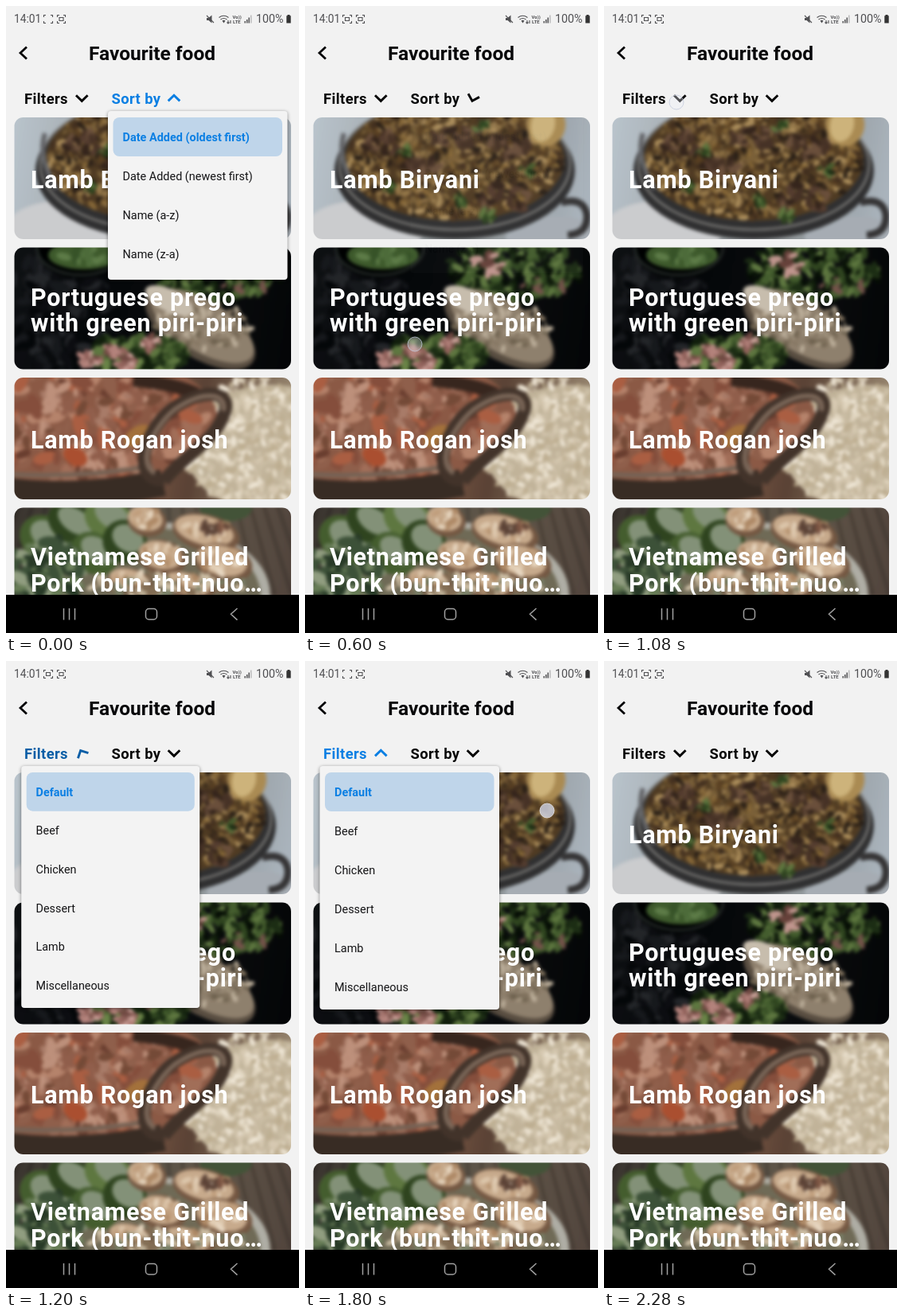
An HTML page with a canvas that plays this animation: 368 by 788 pixels, repeating every 2400 ms.

```html
<!DOCTYPE html>
<html lang="en">
<head>
<meta charset="utf-8">
<title>Favourite food</title>
<style>
  html, body { margin: 0; width: 100%; height: 100%; overflow: hidden; background: #f2f2f2; }
  canvas, svg { position: absolute; left: 0; top: 0; }
  text { font-family: Roboto, sans-serif; font-size: 14.45px; fill: #151517; }
  .title { font-size: 24.5px; font-weight: 700; fill: #08080a; }
  .tab { font-size: 18.4px; font-weight: 700; letter-spacing: .4px; fill: inherit; }
  .dish { font-size: 30.5px; font-weight: 700; letter-spacing: .75px; fill: #fff; }
  .on { font-weight: 700; fill: #0b7fe3; }
  .status text { fill: #505053; }
  .panel { filter: drop-shadow(0 1px 2px #0007); }
  .line { fill: none; }
</style>
</head>
<body>
<canvas id="photos" width="368" height="788"></canvas>
<svg id="ui" width="368" height="788" viewBox="0 0 368 788">
  <g class="status" fill="#505053" stroke="#505053" stroke-width="0">
    <text x="10" y="21" style="font-size:13.8px">14:01</text>
    <g class="line" stroke-width="1.1">
      <path d="M50 11.5h-2.5v2.5M56 11.5h2.5v2.5M50 21.5h-2.5v-2.5M56 21.5h2.5v-2.5"/>
      <path d="M67 11.5h-2.5v2.5M72 11.5h2.5v2.5M67 21.5h-2.5v-2.5M72 21.5h2.5v-2.5M67 14.5h5v4h-5z"/>
      <path id="blink" d="M50.5 14.5h5v4h-5z"/>
      <path d="M252 12l9 9M267.5 14.5q6-4.5 12 0M269.5 17q4-3 8 0M279 18v4m-1.5-1.5l1.5 1.5 1.5-1.5M282 22v-4"/>
    </g>
    <path d="M252 15h2.5l4-3.5v10l-4-3.5h-2.5zM271.5 18.5q2-1.5 4 0l-2 3z"/>
    <text x="284.5" y="15.5" style="font-size:6px;font-weight:700">Vo))</text>
    <text x="285" y="22" style="font-size:6px;font-weight:700">LTE</text>
    <path d="M299.500 19h1.500v2.500h-1.500zM302 17h1.500v4.500h-1.500zM304.500 14.500h1.500v7h-1.500z"/>
    <path opacity=".35" d="M307 11.500h1.500v10h-1.500z"/>
    <text x="314" y="21" style="font-size:14.3px">100%</text>
    <path d="M353.500 11h3v1.200h1.200v9.300h-5.400v-9.300h1.200z" fill="#333"/>
  </g>
  <path class="line" d="M26 51.500l-8 7.500 8 7.500" stroke="#08080a" stroke-width="2.800"/>
  <text class="title" x="104" y="67.700">Favourite food</text>
  <g id="dishes"></g>
  <g id="tabs"></g>
  <g id="menus"></g>
  <circle id="touch" r="9"/>
  <path d="M0 740h368v48H0z"/>
  <g class="line" stroke="#a0a0a0" stroke-width="1.500">
    <path d="M72.500 757v14.500M79.500 757v14.500M86.500 757v14.500M290.500 757l-8 7.300 8 7.300"/>
    <rect x="175.500" y="757.500" width="14" height="13.500" rx="4"/>
  </g>
</svg>
<script>
const $ = id => document.getElementById(id);

// ---- photographs, painted as soft shapes ----
const scene = document.createElement('canvas');
scene.width = 368; scene.height = 788;
const g = scene.getContext('2d');
let seed = 7;
const rnd = () => (seed = (seed * 16807) % 2147483647) / 2147483647;
const pick = list => list[Math.floor(rnd() * list.length)];

function oval(x, y, rx, ry, color, turn = 0, line = 0) {
  g.beginPath();
  g.ellipse(x, y, rx, ry, turn, 0, 7);
  g.lineWidth = line;
  g.fillStyle = g.strokeStyle = color;
  line ? g.stroke() : g.fill();
}
function scatter(x, y, rx, ry, count, size, colors) {
  for (let i = 0; i < count; i++) {
    const a = rnd() * 6.283, r = Math.sqrt(rnd()), s = size * (.5 + rnd());
    oval(x + rx * r * Math.cos(a), y + ry * r * Math.sin(a), s, s * .5, pick(colors), rnd() * 3.1);
  }
}
function curve(d, color, width) {
  g.strokeStyle = color;
  g.lineWidth = width;
  g.stroke(new Path2D(d));
}
function backdrop(y, h, ...colors) {
  const fill = g.createLinearGradient(0, y, 368, y + h * .4);
  colors.forEach((c, i) => fill.addColorStop(i / (colors.length - 1), c));
  g.fillStyle = fill;
  g.fillRect(0, y - 5, 368, h + 10);
}

const leaf = ['#4b6137', '#384b2a', '#627847', '#273620'];
const rice = ['#c4b8a2', '#d8cebb', '#e2dacb', '#cdc1ac', '#b7a98f'];

function biryani() {
  backdrop(140, 153, '#b5bfc7', '#9ea3a6', '#8b9092', '#a7b0b8');
  oval(75, 280, 75, 36, '#c3c4c6');
  oval(312, 290, 60, 26, '#a2a8ae');
  oval(188, 207, 151, 86, '#39393a');
  oval(188, 199, 145, 82, '#777674', 0, 3);
  oval(188, 193, 138, 77, '#55432d');
  scatter(188, 193, 134, 73, 950, 5, ['#7a6340', '#5f482d', '#92784f', '#49382a', '#332a22', '#84693f', '#a88d60']);
  [[102, 174, 28, 14], [250, 242, 32, 19], [195, 165, 32, 12], [144, 202, 22, 10], [256, 175, 25, 12]]
    .forEach(([x, y, rx, ry]) => scatter(x, y, rx, ry, 22, 7, ['#594438', '#3d2f27', '#4d3b30', '#6d5543']));
  [[122, 181], [197, 243], [228, 262], [107, 226], [218, 150], [280, 207]]
    .forEach(([x, y]) => scatter(x, y, 10, 7, 9, 5, leaf));
  oval(303, 150, 24, 27, '#a68a58', .2);
  oval(299, 149, 15, 22, '#c5ae7c', .2);
  curve('M322 247Q350 240 354 262Q356 286 330 288', '#3e3d3e', 9);
  curve('M49 160Q39 190 64 230', '#66676a', 6);
}
function prego() {
  backdrop(303, 154, '#1c1e20', '#121416', '#17191b', '#121314');
  scatter(60, 390, 80, 75, 140, 9, ['#222427', '#121416', '#2d2f32', '#191a1d']);
  oval(94, 306, 56, 36, '#0d0f0f');
  oval(94, 304, 55, 34, '#303533', 0, 3);
  oval(98, 313, 45, 18, '#455e35');
  scatter(98, 313, 35, 12, 22, 8, ['#536e42', '#3f5832', '#617c4e']);
  scatter(260, 334, 85, 40, 210, 8, [...leaf, '#1c2718', '#131a12']);
  scatter(230, 325, 18, 13, 16, 7, ['#987068', '#b9938c', '#694842']);
  scatter(300, 352, 27, 14, 15, 6, ['#755750', '#4c6138']);
  oval(244, 406, 78, 36, '#5d5348', .55);
  oval(247, 402, 73, 32, '#8d806f', .55);
  scatter(247, 402, 60, 29, 100, 5, ['#a29582', '#817462', '#b5a997', '#706554']);
  oval(205, 370, 33, 14, '#c0b7a9', .45);
  scatter(164, 439, 64, 24, 160, 8, [...leaf, '#6c834d', '#1d2919']);
  [[136, 435], [152, 448], [106, 444], [185, 424]].forEach(([x, y]) =>
    scatter(x, y, 13, 9, 18, 6, ['#ad817b', '#73504a', '#c5a099', '#8f655f']));
  scatter(205, 440, 20, 19, 35, 7, leaf);
}
function roganJosh() {
  backdrop(467, 153, '#835c4b', '#956b58', '#5e493d', '#9c8d78');
  oval(333, 556, 108, 80, '#baae97');
  scatter(316, 549, 95, 82, 540, 5, rice);
  oval(94, 520, 172, 84, '#8a5e4c');
  scatter(98, 518, 150, 74, 190, 12, ['#9e705d', '#855444', '#b0836e', '#6c4538', '#a66249', '#8e6351']);
  [[68, 494, 25], [126, 510, 32], [174, 484, 25], [33, 540, 25], [120, 573, 29]]
    .forEach(([x, y, r]) => scatter(x, y, r, r * .6, 24, 8, ['#a47c6b', '#b78f7c', '#76503f', '#8f6251']));
  oval(87, 566, 16, 11, '#a65539', .5);
  oval(165, 540, 19, 11, '#a07343', -.6);
  curve('M160 470Q215 475 240 488', '#3f3029', 16);
  curve('M-5 588Q95 594 184 578', '#77665a', 6);
  curve('M-5 609Q90 622 197 599', '#40352e', 34);
  curve('M199 596C157 598 172 535 208 507C246 480 283 483 275 509C264 548 222 565 198 597', '#493c34', 16);
  curve('M187 587C164 575 183 531 212 507C247 483 278 485 273 509', '#7c6a5d', 6);
}
function bunThit() {
  backdrop(630, 110, '#403a36', '#55534a', '#665c50', '#564b44');
  for (let x = 0; x < 368; x += 17) curve(`M${x} 625l${x / 4 - 45} 115`, '#0002', 5);
  oval(182, 740, 150, 92, '#aaa9a1');
  oval(182, 742, 138, 86, '#716d5b');
  [[51, 671, 36, 29], [83, 651, 33, 24], [129, 644, 32, 26], [111, 688, 31, 25], [149, 673, 28, 27]]
    .forEach(([x, y, rx, ry], i) => {
      oval(x, y, rx, ry, leaf[i % 3], .6);
      oval(x + 4, y - 4, rx * .75, ry * .6, '#839079', .6);
    });
  scatter(53, 709, 46, 35, 90, 10, ['#697c5a', '#445640', '#8f9a80', '#324231']);
  oval(276, 632, 33, 16, '#4a5840');
  [[177, 647, 25, 20], [251, 662, 43, 23], [196, 693, 31, 22], [273, 700, 37, 24], [157, 724, 29, 17], [229, 729, 34, 17]]
    .forEach(([x, y, rx, ry]) => {
      oval(x, y, rx, ry, '#765c49', .25);
      oval(x - 2, y - 3, rx * .88, ry * .78, '#c0a68b', .25);
      scatter(x, y - 2, rx * .7, ry * .6, 14, 6, ['#d3bfa7', '#a98869', '#dccdb9', '#b99b7d']);
    });
  scatter(261, 655, 19, 8, 14, 5, ['#604a3f', '#7b5848']);
  scatter(204, 729, 99, 14, 60, 7, ['#c5b8a1', '#826f59', '#79806a']);
}

const ctx = $('photos').getContext('2d');
[[140, 153, biryani], [303.5, 153, prego], [467, 153, roganJosh], [630.5, 153, bunThit]].forEach(([y, h, paint]) => {
  g.save();
  g.beginPath();
  g.rect(0, y - 5, 368, h + 10);
  g.clip();
  paint();
  g.restore();
  ctx.save();
  ctx.beginPath();
  ctx.roundRect(10.5, y, 347.5, h, 11);
  ctx.clip();
  ctx.filter = 'blur(1.9px) contrast(1.12)';
  ctx.drawImage(scene, 0, 0);
  ctx.restore();
});

// ---- labels, tabs and menus ----
$('dishes').innerHTML = [
  [229, 'Lamb Biryani'], [376.5, 'Portuguese prego'], [409, 'with green piri-piri'],
  [556, 'Lamb Rogan josh'], [703, 'Vietnamese Grilled'], [735.5, 'Pork (bun-thit-nuo…']
].map(([y, s]) => `<text class="dish" x="31" y="${y}">${s}</text>`).join('');

// Each menu shows during steps from..to, moving on its first and last step.
const menus = [
  { label: 'Sort by', x: 132.5, arrow: 211, left: 128, from: -1, to: 5,
    items: ['Date Added (oldest first)', 'Date Added (newest first)', 'Name (a-z)', 'Name (z-a)'] },
  { label: 'Filters', x: 23, arrow: 95.3, left: 18.5, from: 10, to: 16,
    items: ['Default', 'Beef', 'Chicken', 'Dessert', 'Lamb', 'Miscellaneous'] }
];
const maxHeight = 306;
for (const m of menus) {
  $('tabs').insertAdjacentHTML('beforeend',
    `<g><text class="tab" x="${m.x}" y="123">${m.label}</text>
     <path class="line" d="M-7.300-3.600L0 3.600 7.300-3.600" stroke-width="2.900"/></g>`);
  m.tab = $('tabs').lastElementChild;
  const rows = m.items.map((s, i) =>
    `<text class="${i ? '' : 'on'}" x="${m.left + 18.5}" y="${170 + 49 * i}">${s}</text>`).join('');
  const height = Math.min(maxHeight, m.items.length * 49 + 16);
  $('menus').insertAdjacentHTML('beforeend',
    `<g><rect class="panel" x="${m.left}" y="132" width="225.500" height="${height}" rx="4" fill="#f3f3f3"/>
     <rect x="${m.left + 6.5}" y="140" width="212.500" height="49" rx="8" fill="#bfd5ea"/>${rows}</g>`);
  m.panel = $('menus').lastElementChild;
}

function pose(m, step) {
  const p = step < m.from || step > m.to ? 0 : step === m.from ? .85 : step === m.to ? .09 : 1;
  const color = `rgb(${[11, 127, 227].map(c => 8 + (c - 8) * p * p)})`;
  const mid = m.left + 112.7;
  const arrow = m.tab.lastElementChild;
  m.tab.setAttribute('fill', color);
  arrow.setAttribute('stroke', color);
  arrow.setAttribute('transform', `translate(${m.arrow} 115.800) rotate(${180 * p})`);
  m.panel.setAttribute('opacity', p < .5 ? p / 6 : 1);
  m.panel.setAttribute('transform', `translate(${mid} 132) scale(${.957 + .043 * p}) translate(${-mid} -132)`);
}

// A tap is solid for one step, then a fading ring.
const taps = [[4, 138, 425], [8, 91, 121], [15, 304, 188]];

function draw(now) {
  const step = Math.floor(now % 2400 / 120);
  menus.forEach(m => pose(m, step));
  $('blink').setAttribute('opacity', Math.floor((step + .5) / 5.5) % 2);
  const [at, x, y] = taps.find(([s]) => step === s || step === s + 1) || [];
  const ring = step !== at;
  const look = {
    cx: x || 0, cy: y || 0, opacity: x ? .8 : 0,
    fill: ring ? '#eef1fb' : '#cfd4e6', 'fill-opacity': ring ? .4 : 1,
    stroke: ring ? '#c3cadc' : '#f4f6ff'
  };
  for (const key in look) $('touch').setAttribute(key, look[key]);
}
const start = performance.now();
function tick() {
  draw(performance.now() - start);
  requestAnimationFrame(tick);
}
tick();
</script>
</body>
</html>
```
